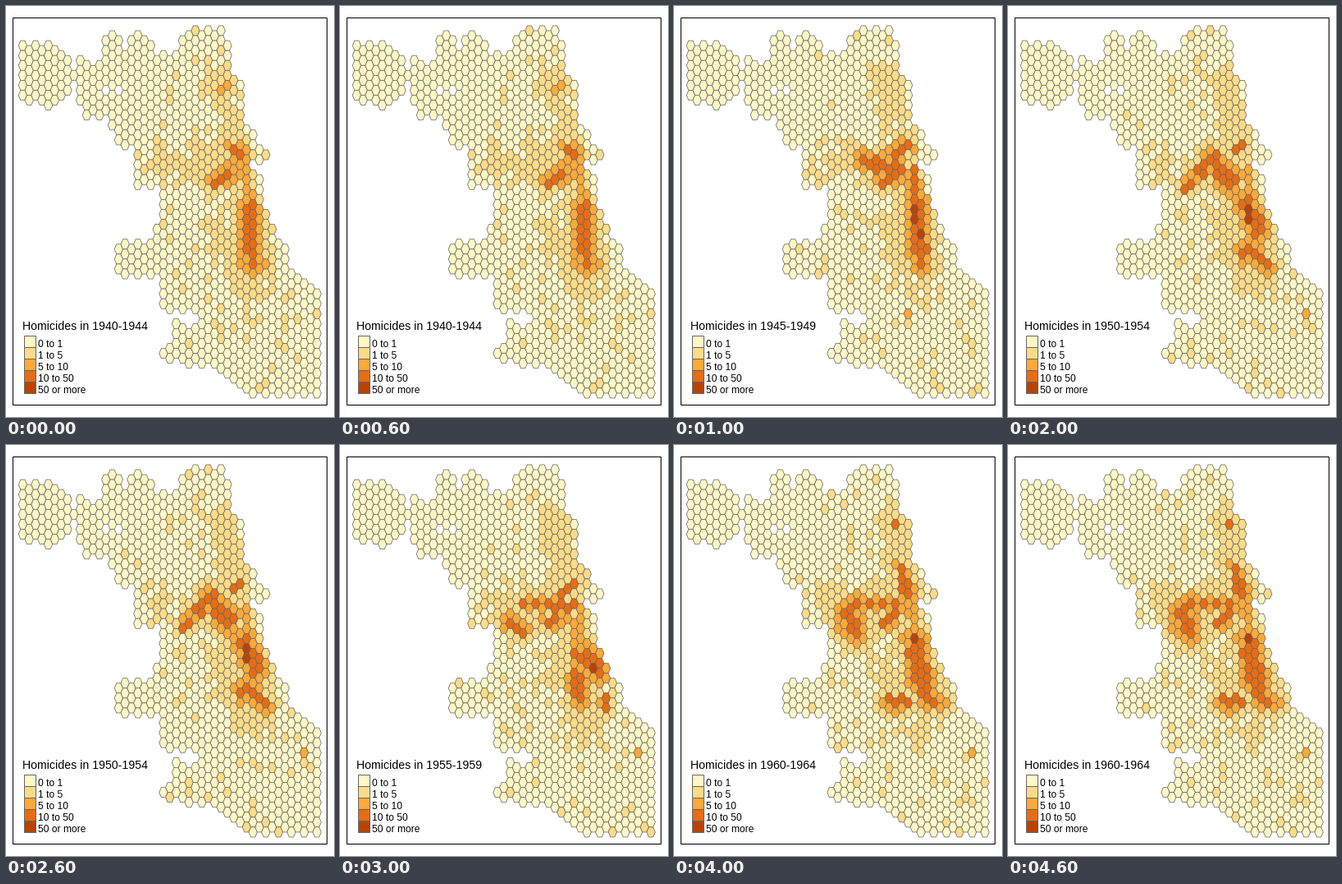
Animation of 400x500 px, one loop 5000 ms. Source, as a matplotlib script:

```python
import numpy as np
import matplotlib.pyplot as plt
from matplotlib.animation import FuncAnimation
from matplotlib.collections import PolyCollection
from matplotlib.patches import Rectangle
from matplotlib.path import Path

W, H, DPI = 400, 500, 100
PX = 72 / DPI
COLORS = np.array(["#FFF7C6", "#FEDB87", "#FEA938", "#E86C11", "#B94304"])
LABELS = ["0 to 1", "1 to 5", "5 to 10", "10 to 50", "50 or more"]
EDGE = "#666666"

# Flat-topped hexagons: column step and half of the row step
X0, Y0, DX, DY = 20.4, 30, 7.8, 6.04
COLS, ROWS = 47, 74

# City limits, clockwise: lake side from north to south, then inland
SHORE = [(118, 36), (129, 32), (140, 36), (142, 54), (148, 54), (150, 36),
         (161, 32), (180, 42), (181, 57), (211, 57), (211, 38), (228, 25),
         (267, 25), (267, 42), (274, 42), (274, 80), (290, 93), (290, 147),
         (305, 152), (305, 170), (320, 177), (320, 185), (312, 191),
         (297, 189), (297, 202), (313, 206), (313, 244), (336, 286),
         (344, 294), (344, 317), (384, 345), (384, 480), (300, 480)]
INLAND = [(254, 439), (212, 437), (209, 431), (187, 431), (187, 417),
          (203, 409), (203, 381), (211, 381), (223, 393), (235, 386),
          (235, 371), (188, 371), (188, 329), (133, 329), (133, 286),
          (180, 286), (180, 265), (188, 265), (188, 219), (157, 219),
          (157, 171), (134, 171), (126, 136), (95, 136), (95, 120), (87, 120),
          (87, 90), (80, 90), (80, 108), (52, 125), (36, 114), (28, 118),
          (15, 112), (15, 45), (56, 45), (80, 66), (83, 78), (88, 62),
          (106, 70), (117, 68)]
ENCLAVES = [(13, 12), (15, 12)]

grid = [(c, r) for c in range(COLS) for r in range(ROWS)
        if (c + r) % 2 and (c, r) not in ENCLAVES]
centers = np.array([(X0 + DX * c, Y0 + DY * r) for c, r in grid])
centers = centers[Path(SHORE + INLAND).contains_points(centers)]

# Hot strips: start, end, reach, peak class
COMMON = [((262, 90), (282, 165), 35, 1.4),
          ((190, 190), (265, 190), 40, 1.3),
          ((265, 270), (300, 345), 40, 1.3),
          ((292, 200), (290, 235), 11, 2.7)]
PERIODS = {
    "1940-1944": [((296, 245), (300, 312), 18, 3.6),
                  ((278, 174), (285, 180), 12, 3.5),
                  ((254, 216), (270, 207), 13, 3.3),
                  ((262, 100), (268, 95), 9, 2.7),
                  ((262, 195), (290, 195), 13, 2.5)],
    "1945-1949": [((294, 200), (294, 235), 9, 3.5),
                  ((296, 245), (302, 312), 17, 3.6),
                  ((293, 247), (293, 260), 6, 4.6),
                  ((301, 277), (301, 277), 6, 4.6),
                  ((232, 186), (275, 200), 14, 3.6),
                  ((252, 213), (272, 212), 12, 3.6),
                  ((270, 180), (285, 170), 11, 3.6),
                  ((285, 374), (285, 374), 5, 2.6)],
    "1950-1954": [((293, 247), (293, 260), 6, 4.6),
                  ((218, 220), (252, 183), 10, 3.6),
                  ((250, 188), (270, 212), 18, 3.6),
                  ((278, 173), (285, 168), 10, 3.6),
                  ((292, 240), (304, 275), 18, 3.6),
                  ((288, 296), (314, 318), 13, 3.6),
                  ((364, 374), (364, 374), 5, 2.6)],
    "1955-1959": [((223, 193), (285, 197), 10, 3.6),
                  ((254, 216), (272, 212), 10, 3.6),
                  ((270, 180), (286, 170), 9, 3.6),
                  ((207, 213), (222, 225), 13, 3.6),
                  ((296, 255), (312, 272), 20, 3.6),
                  ((290, 280), (292, 308), 15, 3.6),
                  ((322, 307), (324, 318), 9, 3.6),
                  ((364, 374), (364, 374), 5, 2.6)],
    "1960-1964": [((211, 203), (222, 225), 19, 3.6),
                  ((222, 192), (270, 194), 11, 3.5),
                  ((258, 216), (270, 208), 11, 3.6),
                  ((278, 150), (286, 186), 11, 3.6),
                  ((294, 237), (305, 295), 18, 3.6),
                  ((264, 313), (283, 313), 13, 3.6),
                  ((308, 310), (324, 313), 13, 3.6),
                  ((270, 96), (270, 96), 8, 3.6),
                  ((364, 374), (364, 374), 5, 2.6)],
}


def distance(a, b):
    """Distance of every cell from the segment a-b."""
    a, ab = np.array(a), np.subtract(b, a)
    t = np.clip((centers - a) @ ab / max(ab @ ab, 1), 0, 1)
    return np.hypot(*(centers - a - t[:, None] * ab).T)


def classify(strips, seed):
    level = np.interp(centers[:, 0], [80, 200], [0.25, 0.76])
    for a, b, reach, peak in COMMON + strips:
        level = np.maximum(level, peak / (1 + (distance(a, b) / reach) ** 2))
    level += np.random.default_rng(seed).normal(0, 0.2, len(level))
    return np.clip(level, 0, 4).astype(int)


frames = [(years, COLORS[classify(strips, seed)])
          for seed, (years, strips) in enumerate(PERIODS.items())]

fig = plt.figure(figsize=(W / DPI, H / DPI), dpi=DPI, facecolor="white")
ax = fig.add_axes([0, 0, 1, 1])
ax.set_xlim(0, W)
ax.set_ylim(H, 0)
ax.axis("off")

corners = np.array([(-2, 0), (-1, -1), (1, -1), (2, 0), (1, 1), (-1, 1)])
hexagon = corners * (DX / 3, DY)
hexes = PolyCollection([hexagon + p for p in centers],
                       edgecolors=EDGE, linewidths=0.75 * PX)
ax.add_collection(hexes, autolim=False)


def box(x, y, w, h, face, edge):
    ax.add_patch(Rectangle((x, y), w, h, facecolor=face, edgecolor=edge,
                           linewidth=PX, snap=False))


def write(x, y, text, size):
    return ax.text(x, y, text, fontsize=size * PX, family="Liberation Sans",
                   color="black", va="baseline")


box(8.5, 14.5, 383, 471, "none", "black")
for i, (color, label) in enumerate(zip(COLORS, LABELS)):
    box(22.5, 401.5 + 14 * i, 14, 14, color, EDGE)
    write(39, 415 + 14 * i, label, 12)
title = write(19.5, 394, "", 14.1)


def draw(i):
    years, faces = frames[i]
    hexes.set_facecolor(faces)
    title.set_text("Homicides in " + years)
    return hexes, title


anim = FuncAnimation(fig, draw, frames=len(frames), interval=1000,
                     repeat=True, repeat_delay=0)
plt.show()
```
